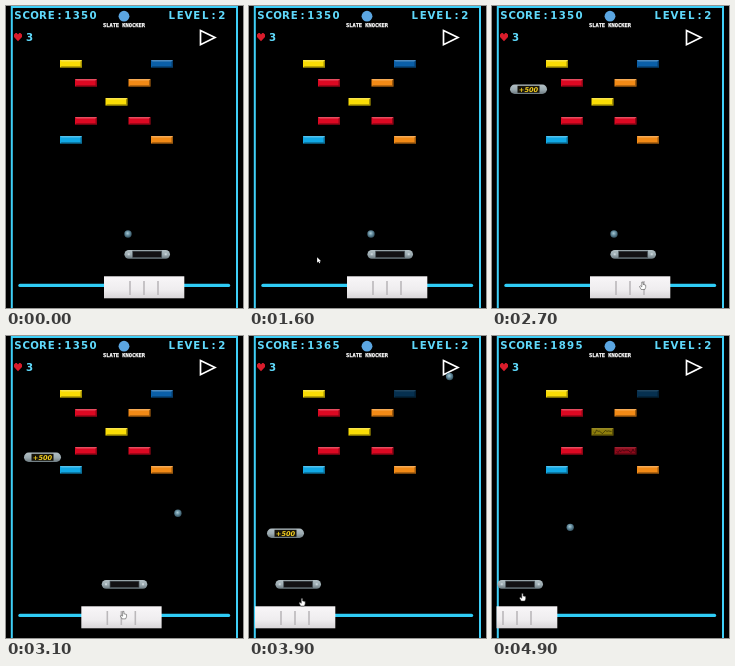
An HTML page that plays this animation: 237x302 px, repeating every 5000 ms.

```html
<!DOCTYPE html>
<html lang="en">
<head>
<meta charset="utf-8">
<title>Brick game</title>
<style>
  html, body { margin: 0; width: 100%; height: 100%; overflow: hidden; background: #000; }
  svg { display: block; width: 237px; height: 302px; }
  text { font-family: "DejaVu Sans", sans-serif; font-weight: 700; text-anchor: middle; }
  .hud { font-size: 10.2px; fill: #5fd9fb; }
  .brand { font: 700 5.4px "DejaVu Sans Mono", monospace; fill: #fff; stroke: #fff; stroke-width: .25; }
</style>
</head>
<body>
<svg viewBox="0 0 237 302">
  <defs>
    <linearGradient id="steel" x2="0" y2="1">
      <stop offset="0" stop-color="#b3c0c5"/>
      <stop offset=".55" stop-color="#9baab0"/>
      <stop offset="1" stop-color="#6c797f"/>
    </linearGradient>
    <linearGradient id="grip" x2="0" y2="1">
      <stop offset="0" stop-color="#f8f6f8"/>
      <stop offset=".6" stop-color="#efedef"/>
      <stop offset="1" stop-color="#d8d5d8"/>
    </linearGradient>
    <radialGradient id="orb" cx=".45" cy=".4" r=".65">
      <stop offset="0" stop-color="#a9cbd6"/>
      <stop offset=".5" stop-color="#5d8496"/>
      <stop offset="1" stop-color="#2c4754"/>
    </radialGradient>
    <clipPath id="field"><rect x="4.5" width="228" height="302"/></clipPath>
  </defs>
  <rect width="237" height="302"/>
  <path d="M5.8 302V1H231V302" fill="none" stroke="#3fd0f8" stroke-width="2"/>

  <text id="score" class="hud" y="12.9"></text>
  <text id="level" class="hud" y="12.9"></text>
  <text class="hud" x="23.6" y="35.4">3</text>
  <path d="M12 35.2L8 31V28.6L9.6 27H10.8L12 28.4L13.2 27H14.4L16 28.6V31Z" fill="#d91c2b"/>
  <circle cx="118" cy="10.2" r="5.4" fill="#5ba6e2"/>
  <text class="brand" x="118" y="20.7">SLATE KNOCKER</text>
  <path d="M194.5 24.5L209 31.5L194.5 38.7Z" fill="none" stroke="#fff" stroke-width="1.7"/>

  <g id="bricks"></g>
  <g id="paddle">
    <rect x="-22.8" y="-4.4" width="45.6" height="8.8" rx="4.4" fill="url(#steel)"/>
    <rect x="-14.5" y="-3.2" width="29" height="6.4" fill="#121113" stroke="#4b555a" stroke-width=".7"/>
    <path d="M-19.5 0h2M17.5 0h2" stroke="#c9d5da" stroke-width="2"/>
  </g>
  <g id="pill">
    <rect x="-18.5" y="-4.7" width="37" height="9.4" rx="4.7" fill="url(#steel)"/>
    <rect x="-11" y="-3.5" width="22" height="7" fill="#16130a"/>
    <text y="2.4" font-size="6.6" font-style="italic" fill="#f5d020">+500</text>
  </g>
  <circle id="ball" r="3.7" fill="url(#orb)"/>

  <path d="M14 279.4H222.5" stroke="#2fccf6" stroke-width="3.4" stroke-linecap="round"/>
  <g clip-path="url(#field)">
    <g id="slider">
      <rect x="-40" y="270.3" width="80.3" height="22" fill="url(#grip)"/>
      <path d="M-14 275v14M0 275v14M14 275v14" stroke="#bbb8bb" stroke-width="1.6"/>
    </g>
  </g>
  <path id="arrow" d="M0 0V5.5L1.3 4.4L2.2 6.2L3.1 5.8L2.3 4.1H4Z" fill="#fff"/>
  <path id="hand" d="M-.7 0H.6V2.4L3.2 3.1V5.4L2.3 7.5H-1.3L-3 4.5L-2.2 3.8L-.7 4.8Z"
        fill="#fff" stroke="#333" stroke-width=".5"/>
</svg>
<script>
const LOOP = 5000, STEP = 100, LAUNCH = 2905, CATCH = 4350;
const $ = id => document.getElementById(id);
const move = (id, x, y) => $(id).setAttribute('transform', `translate(${x} ${y})`);
const show = (id, on) => $(id).setAttribute('visibility', on ? 'visible' : 'hidden');

// arcade lettering: every glyph centred in a cell of equal width
function letter(id, x, text) {
  $(id).setAttribute('x', [...text].map((_, i) => x + 8.35 * i).join(' '));
  $(id).textContent = text;
}

// bricks stand in an X: row r fills columns r and 4 - r
const paint = { Y: '#f9dc05', R: '#dc0822', O: '#f28a16', B: '#0a5fa8', C: '#11a9e6' };
const worn = { Y: '#8d7d0c', R: '#8f0a1b', B: '#06304f' };
const columns = [54, 69, 99.5, 122.5, 145];
const hits = {
  '0,4': { at: 3555, side: true },
  '3,3': { at: 4155 },
  '2,2': { at: 4185 }
};
const bricks = [];
['YB', 'RO', 'Y', 'RR', 'CO'].forEach((row, r) => {
  const cols = [...new Set([r, 4 - r])].sort();
  cols.forEach((c, i) => bricks.push({ x: columns[c], y: 54 + 19 * r, kind: row[i], hit: hits[[r, c]] }));
});

// zigzag cracks from a small seeded generator
let seed = 7;
const rand = () => (seed = seed * 16807 % 2147483647) / 2147483647;
const crack = () => 'M2 4' + Array.from({ length: 12 }, (_, i) =>
  `L${3.5 + 1.5 * i} ${(1.8 + 4 * rand()).toFixed(1)}`).join('');

$('bricks').innerHTML = bricks.map(b =>
  `<g transform="translate(${b.x} ${b.y})"><rect width="22" height="7.6"/>
   <path d="M0 0H22L20.5 1.4H1.5Z" fill="#fff" opacity=".28"/>
   <path d="M0 7.6H22V0L20.5 1.4V6.2H1.5Z" opacity=".35"/>
   <path d="${crack()}" fill="none" stroke="#000" stroke-opacity=".5" stroke-width=".9"/></g>`).join('');
bricks.forEach((b, i) => b.parts = $('bricks').children[i].children);

function drawBrick(b, t) {
  const isHit = b.hit && t >= b.hit.at;
  const [face, shine, , cracks] = b.parts;
  face.setAttribute('fill', (isHit ? worn : paint)[b.kind]);
  shine.setAttribute('opacity', isHit ? .1 : .28);
  cracks.setAttribute('visibility', isHit && b.kind !== 'B' ? 'visible' : 'hidden');
}

// constant speed, reflected by walls, paddle and bricks
function ballAt(t) {
  let x = 122, y = 228, vx = .256, vy = -.26;
  for (let s = LAUNCH; s < t; s++) {
    x += vx;
    y += vy;
    if (x < 11.5 || x > 229) vx = -vx;
    if (y < 5 || y > 238) vy = -vy;
    const b = bricks.find(b => b.hit && b.hit.at === s);
    if (b && b.hit.side) vx = -vx;
    else if (b) vy = -vy;
  }
  return [x, y];
}

// part of a travel covered by time t, eased by a power
const glide = (t, start, length, travel, power) =>
  travel * Math.min(1, Math.max(0, (t - start) / length)) ** power;

const sliderAt = t => 138 + glide(t, 2900, 1000, -92, .87) + glide(t, 3900, 1000, -21, 2.5);
const cursorAt = t => [
  53 + glide(t, 1300, 800, 97.5, 1.9) + glide(t, 2900, 1000, -97.5, .67) + glide(t, 3900, 1000, -22.5, 2.4),
  246 + glide(t, 1300, 800, 30, 1.8) + glide(t, 2900, 1000, -13.5, 1.9) + glide(t, 3900, 1000, -5, 1.3)
];

function draw(t) {
  const broken = bricks.filter(b => b.hit && t >= b.hit.at).length;
  letter('score', 11.8, 'SCORE:' + (1350 + 15 * broken + (t >= CATCH ? 500 : 0)));
  bricks.forEach(b => drawBrick(b, t));

  const sx = sliderAt(t);
  move('slider', sx, 0);
  move('paddle', sx + 3.2, 248.3);
  move('ball', ...ballAt(t));

  move('pill', 36.5, 83.3 + .095 * (t - 2700));
  show('pill', t >= 1880 && t < CATCH);

  const tip = cursorAt(t), grab = t >= 2050;
  move('arrow', ...tip);
  move('hand', ...tip);
  show('arrow', t >= 1300 && !grab);
  show('hand', grab);
}

letter('level', 165.8, 'LEVEL:2');
const start = performance.now();
function tick() {
  const t = (performance.now() - start) % LOOP;
  draw(Math.floor(t / STEP) * STEP);
  requestAnimationFrame(tick);
}
tick();
</script>
</body>
</html>
```
